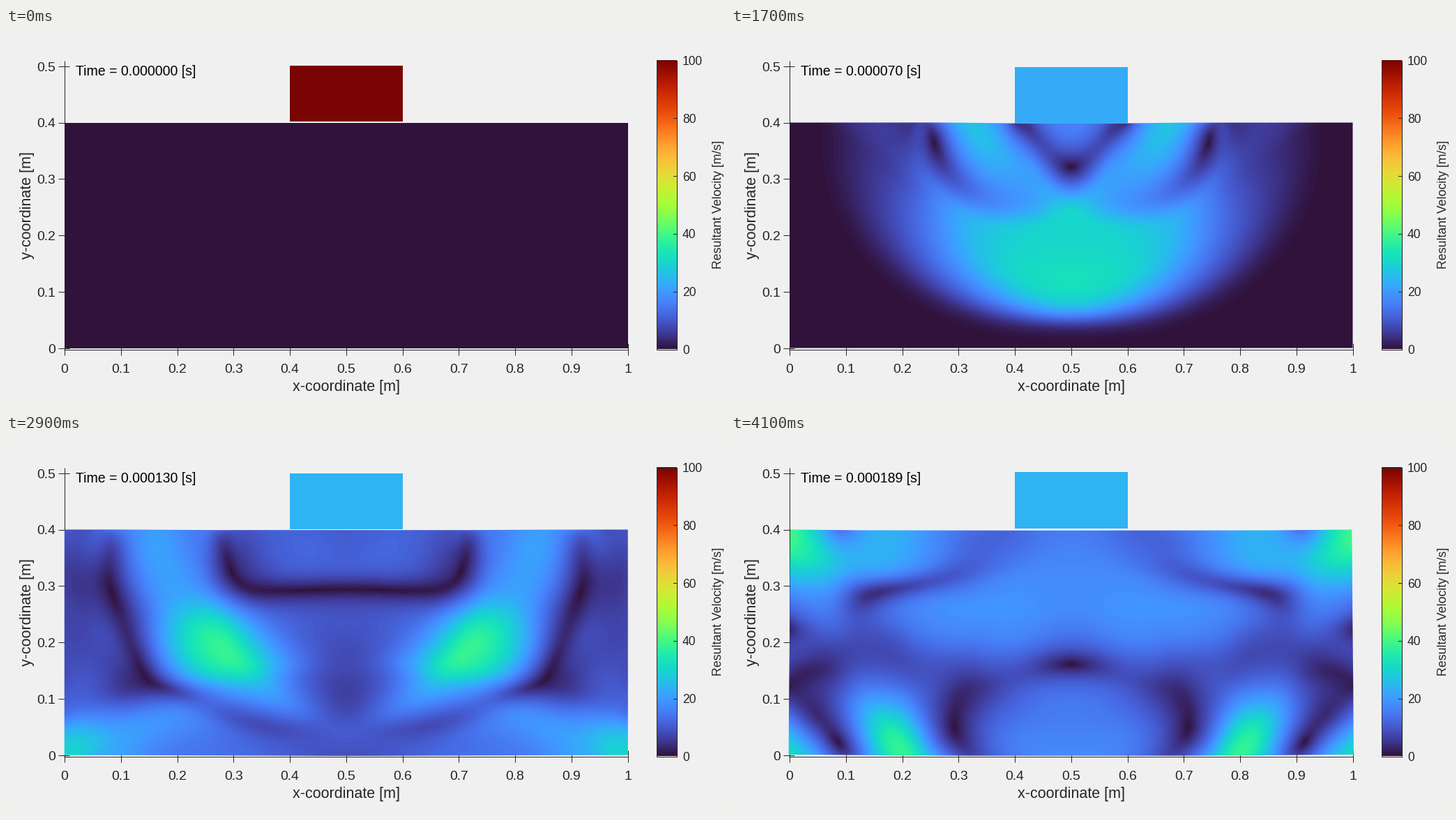
Recreate the animation shown at these times as a matplotlib script. Size 1031x543 px, loop 4.3 s.

```python
import numpy as np
import matplotlib.pyplot as plt
from matplotlib.animation import FuncAnimation
from matplotlib.patches import Rectangle
from matplotlib.path import Path

W, H, DPI = 1031, 543, 64
PX = 72 / DPI
BG, INK = "#f0f0f0", "#262626"
plt.rcParams["font.family"] = "Liberation Sans"

# Output instants in microseconds
TIMES = [0, 9, 20, 29, 40, 50, 60, 70, 80, 90,
         99, 110, 120, 130, 139, 149, 160, 170, 180, 189]

# Steel plate: lengths in metres, times in microseconds
CP, CS = 5.86e-3, 3.13e-3
STEP, DT = 0.004, 0.25
NX, NY = 250, 100
GAP = 0.85e-3
CONTACT_TIME = 12.5
DAMPING = 0.1


def block_speed(t):
    """Downward speed of the rigid block in m/s."""
    knots = [0, 8.5, 14, 20, 29, 40, 50, 60, 70, 80]
    speeds = [100, 100, 94, 79, 51, 18, -3, -15.5, -22.5, -24]
    return np.interp(t, knots, speeds)


def corners(a):
    return a[:, :-1, :-1], a[:, :-1, 1:], a[:, 1:, :-1], a[:, 1:, 1:]


def elastic_force(u):
    """Nodal forces per density of bilinear square elements."""
    sw, se, nw, ne = corners(u)
    ddx = (se + ne - sw - nw) / (2 * STEP)
    ddy = (nw + ne - sw - se) / (2 * STEP)
    p, s = CP ** 2, CS ** 2
    lam = p - 2 * s
    sxx = p * ddx[0] + lam * ddy[1]
    syy = lam * ddx[0] + p * ddy[1]
    sxy = s * (ddx[1] + ddy[0])
    fx = np.stack([sxx, sxy]) * STEP / 2
    fy = np.stack([sxy, syy]) * STEP / 2
    twist = (p + s) / 12 * (sw + ne - se - nw)
    force = np.zeros_like(u)
    fsw, fse, fnw, fne = corners(force)
    fsw += fx + fy - twist
    fse += fy - fx + twist
    fnw += fx - fy + twist
    fne -= fx + fy + twist
    return force


def simulate():
    """Return speed field, displacement and block travel at each instant."""
    u = np.zeros((2, NY + 1, NX + 1))
    v = np.zeros_like(u)
    mass = np.full((NY + 1, NX + 1), STEP ** 2)
    mass[[0, -1]] /= 2
    mass[:, [0, -1]] /= 2
    left, right = round(0.4 * NX), round(0.6 * NX)
    width = np.full(right - left + 1, STEP)
    width[[0, -1]] /= 2

    travel, shots = 0.0, []
    marks = {round(t / DT) for t in TIMES}
    for n in range(round(TIMES[-1] / DT) + 1):
        if n in marks:
            shots.append((np.hypot(*v) * 1e6, u.copy(), travel))
        force = elastic_force(u + DAMPING * v)
        press = travel - GAP + u[1, -1, left:right + 1]
        force[1, -1, left:right + 1] -= CP / CONTACT_TIME * np.maximum(press, 0) * width
        v += DT * force / mass
        u += DT * v
        travel += DT * 1e-6 * block_speed((n + 0.5) * DT)
    return shots


SCALE = 807.5


def px(x):
    return 84 + SCALE * x


def py(y):
    return 458.5 - SCALE * y


def outline(u):
    """Deformed plate edge as a closed path in pixels."""
    gx, gy = np.meshgrid(np.arange(NX + 1) * STEP, np.arange(NY + 1) * STEP)
    pts = np.stack([px(gx + u[0]), py(gy + u[1])], axis=-1)
    ring = [pts[0], pts[1:, -1], pts[-1, -2::-1], pts[-2::-1, 0]]
    return Path(np.concatenate(ring))


SHOTS = simulate()

fig = plt.figure(figsize=(W / DPI, H / DPI), dpi=DPI, facecolor=BG)
ax = fig.add_axes([0, 0, 1, 1])


def line(x0, y0, x1, y1):
    ax.plot([x0, x1], [y0, y1], color=INK, lw=PX, zorder=1, solid_capstyle="butt")


def label(x, y, s, size, ha="center", color=INK, rotation=0):
    return ax.text(x, y, s, fontsize=size * PX, ha=ha, va="baseline", color=color,
                   rotation=rotation, rotation_mode="anchor", zorder=5)


# Axes
line(83.5, 47, 83.5, 461)
line(83, 460.5, 892, 460.5)
for i in range(11):
    x = px(i / 10)
    line(x, 452, x, 469)
    label(x, 494, f"{i / 10:g}", 19.4)
for i in range(6):
    y = py(i / 10)
    line(75, y, 91, y)
    label(71, y + 7, f"{i / 10:g}", 19.4, ha="right")
label(488, 520, "x-coordinate [m]", 21.5)
label(36, 254, "y-coordinate [m]", 21.5, rotation=90)

# Colour bar
ax.imshow(np.linspace(0, 1, 256)[:, None], cmap="turbo", origin="lower", aspect="auto",
          extent=(932.5, 961.5, 460.5, 46.5), interpolation="nearest", zorder=2)
ax.add_patch(Rectangle((932.5, 46.5), 29, 414, fill=False, ec=INK, lw=PX, zorder=3))
for val in range(0, 101, 20):
    y = 460.5 - 4.14 * val
    ax.plot([957, 961.5], [y, y], color=INK, lw=PX, zorder=3)
    label(970, y + 6.5, str(val), 17.5, ha="left")
label(1026, 253, "Resultant Velocity [m/s]", 17.7, rotation=90)

# Moving parts
pad = 1.5 * STEP
plate = ax.imshow(np.zeros((NY + 3, NX + 3)), cmap="turbo", vmin=0, vmax=100,
                  origin="lower", aspect="auto", interpolation="bilinear", zorder=2,
                  extent=(px(-pad), px(1 + pad), py(-pad), py(0.4 + pad)))
block = ax.add_patch(Rectangle((px(0.4), 0), 0.2 * SCALE, 0.1 * SCALE, lw=0, zorder=3))
clock = label(100, 67.5, "", 19.5, ha="left", color="black")

ax.set_xlim(0, W)
ax.set_ylim(H, 0)
ax.axis("off")


def draw(frame):
    k = max(0, (frame - 3) // 2)
    speed, u, travel = SHOTS[k]
    plate.set_data(np.pad(speed, 1, mode="edge"))
    plate.set_clip_path(outline(u), ax.transData)
    block.set_y(py(0.5 + 1.4e-3 - travel))
    block.set_facecolor(plt.cm.turbo(abs(block_speed(TIMES[k])) / 100))
    clock.set_text(f"Time = {TIMES[k] * 1e-6:.6f} [s]")
    return plate, block, clock


anim = FuncAnimation(fig, draw, frames=43, interval=100, repeat=True, repeat_delay=0)
plt.show()
```
